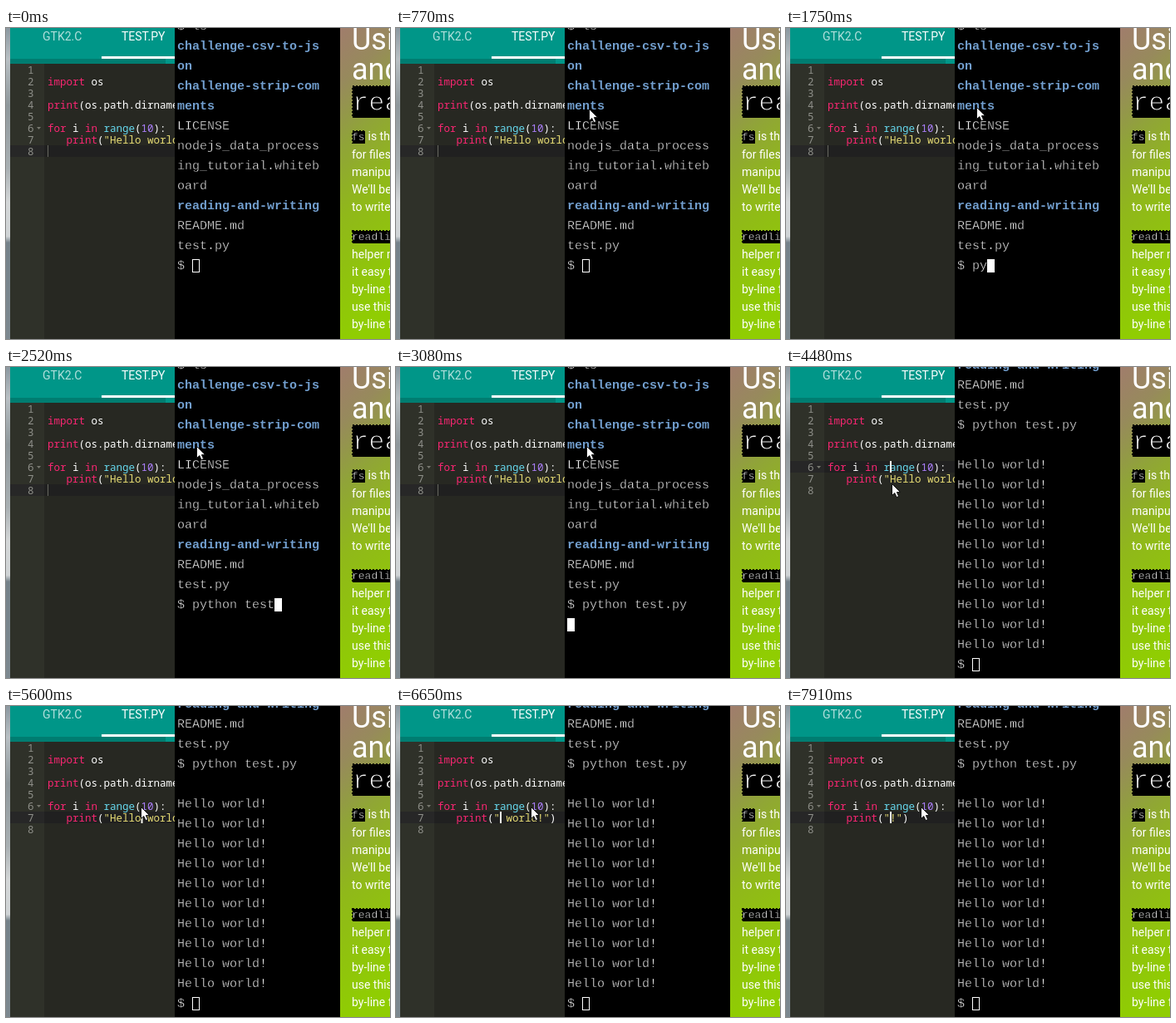
An HTML page for the animation above (8 s loop, 462 by 374 pixels).

```html
<!DOCTYPE html>
<html lang="en">
<head>
<meta charset="utf-8">
<title>Editor and terminal</title>
<style>
  html, body { margin: 0; width: 100%; height: 100%; overflow: hidden; background: #000; }
  svg { display: block; width: 462px; height: 374px; }
  text { white-space: pre; }
  .ui { font-family: Roboto, "Open Sans", sans-serif; font-size: 14px; fill: #fff; }
  .code { font-family: "Noto Sans Mono", "DejaVu Sans Mono", monospace; font-size: 12.5px; font-weight: 500; fill: #fff; }
  /* A black outline over the fill thins the strokes. */
  .term, .mono { font-family: "Liberation Mono", monospace; fill: #eee; stroke: #000; stroke-width: .35; }
  .term { font-size: 15px; }
  .mono { font-size: 13px; }
  .dir { font-weight: bold; fill: #729fcf; stroke: none; }
  .num { fill: #8f908a; text-anchor: end; }
  .kw { fill: #f92672; }
  .fn { fill: #66d9ef; }
  .str { fill: #e6db74; }
  .lit { fill: #ae81ff; }
  .h { font-size: 36px; }
  .big { font-size: 32px; stroke-width: 1.1; }
  .tag { fill: #000; stroke: #000; stroke-dasharray: 2 2; shape-rendering: crispEdges; }
</style>
</head>
<body>
<svg viewBox="0 0 462 374">
  <defs>
    <linearGradient id="edge" x2="0" y2="1">
      <stop offset="0" stop-color="#8b98a0"/>
      <stop offset=".1" stop-color="#b9c0c4"/>
      <stop offset=".25" stop-color="#8f989c"/>
      <stop offset=".45" stop-color="#a9b0b3"/>
      <stop offset=".56" stop-color="#d4d7d8"/>
      <stop offset=".67" stop-color="#d0d4d6"/>
      <stop offset=".69" stop-color="#75828a"/>
      <stop offset="1" stop-color="#7d8990"/>
    </linearGradient>
    <linearGradient id="page" x2=".15" y2="1">
      <stop offset="0" stop-color="#a07d6c"/>
      <stop offset=".18" stop-color="#978a5c"/>
      <stop offset=".38" stop-color="#90a438"/>
      <stop offset=".6" stop-color="#90b81a"/>
      <stop offset="1" stop-color="#90cd02"/>
    </linearGradient>
  </defs>

  <rect width="5" height="374" fill="url(#edge)"/>
  <rect x="5" width="198" height="374" fill="#272822"/>
  <rect x="5" width="41" height="374" fill="#2f3129"/>
  <g id="active">
    <rect x="5" width="41" height="14" fill="#272727"/>
    <rect x="46" width="157" height="14" fill="#202020"/>
  </g>
  <g id="code" class="code"></g>
  <path d="M37 119h5l-2.5 3z" fill="#77786f"/>
  <rect id="caret" height="14"/>
  <rect x="5" width="198" height="43" fill="#009688"/>
  <rect x="5" y="37" width="187" height="6" fill="#007d71"/>
  <rect x="115" y="34" width="88" height="3" fill="#fff"/>
  <g class="ui">
    <text x="44" y="15" opacity=".7">GTK2.C</text>
    <text x="139" y="15">TEST.PY</text>
  </g>

  <rect x="203" width="199" height="374"/>
  <g id="term" class="term"></g>
  <rect id="block"/>

  <rect x="402" width="60" height="374" fill="url(#page)"/>
  <g id="article" class="ui">
    <text class="h" x="416" y="26">Using</text>
    <text class="h" x="416" y="62">and</text>
    <rect class="tag" x="416.5" y="69.5" width="60" height="38"/>
    <text class="mono big" x="417" y="98.5">readline</text>
    <rect class="tag" x="416.5" y="123.5" width="15" height="15"/>
    <text class="mono" x="416" y="135">fs</text>
    <text x="435.5" y="135">is the</text>
    <rect class="tag" x="416.5" y="243.5" width="60" height="15"/>
    <text class="mono" x="416" y="255">readline</text>
  </g>

  <path id="mouse" d="M.5 .5V14.5L3.8 11.6 6 16.6 8.6 15.5 6.4 10.6H10.6Z"
        fill="#fff" stroke="#111" stroke-width="1" stroke-linejoin="round"/>
</svg>
<script>
const LOOP = 8000, TICK = 70;
const CHAR = 7.5, CODE_X = 50, ROW = 14, CODE_TOP = 43;
const TERM_X = 206, CELL = 9, LINE = 24;
const FOCUS_TERM = 840, ENTER = 3010, OUTPUT = 3150, BLINK = 3780, FOCUS_CODE = 4340;

const $ = id => document.getElementById(id);
const esc = s => s.replace(/&/g, "&amp;").replace(/</g, "&lt;");
const label = (x, y, html, cls = "") => `<text x="${x}" y="${y}" class="${cls}">${html}</text>`;
const span = (cls, s) => `<tspan class="${cls}">${esc(s)}</tspan>`;
const count = (times, t) => times.filter(at => at <= t).length;
const place = (el, attrs) => Object.entries(attrs).forEach(([k, v]) => el.setAttribute(k, v));

// Editor
const kw = s => span("kw", s);
const sourceLines = greeting => [
  "",
  kw("import") + " os",
  "",
  kw("print") + "(os.path.dirname(os.path",
  "",
  kw("for") + " i " + kw("in") + " " + span("fn", "range") + "(" + span("lit", "10") + "):",
  "   " + kw("print") + "(" + span("str", `"${greeting}"`) + ")",
  ""
];
const backspaces = [5880, 6090, 6230, 6440, 6650];
const deletes = [7140, 7280, 7420, 7560, 7700, 7910];

function caretAt(t) {
  if (t < FOCUS_CODE) return [8, 0];
  if (t < 4690) return [6, 10];
  if (t < 5250) return [8, 0];
  return [7, 15 - count(backspaces, t)];
}

function drawEditor(t) {
  const greeting = "Hello".slice(0, 5 - count(backspaces, t)) + " world".slice(count(deletes, t)) + "!";
  $("code").innerHTML = sourceLines(greeting).map((line, i) => {
    const y = CODE_TOP + ROW * i + 11.5;
    return label(33.5, y, i + 1, "num") + label(CODE_X, y, line);
  }).join("");
  const [row, col] = caretAt(t), y = CODE_TOP + ROW * (row - 1), focused = t >= FOCUS_CODE;
  $("active").setAttribute("transform", `translate(0 ${y})`);
  place($("caret"), {
    x: CODE_X + col * CHAR, y, width: focused ? 2 : 1, fill: focused ? "#f8f8f0" : "#66675f"
  });
}

// Terminal
const dir = s => span("dir", s);
const listing = [
  "$ ls", dir("challenge-csv-to-js"), dir("on"), dir("challenge-strip-com"), dir("ments"),
  "LICENSE", "nodejs_data_process", "ing_tutorial.whiteb", "oard",
  dir("reading-and-writing"), "README.md", "test.py"
];
const command = "python test.py";
const keys = [1470, 1750, 1890, 1960, 2030, 2170, 2240, 2310, 2380, 2450, 2520, 2660, 2800, 2870];

function drawTerminal(t) {
  const typed = command.slice(0, count(keys, t));
  const rows = [...listing, "$ " + typed];
  let col = 2 + typed.length;
  if (t >= ENTER) { rows.push(""); col = 0; }
  if (t >= OUTPUT) { rows.push(...Array(10).fill("Hello world!"), "$ "); col = 2; }
  const view = rows.slice(-16);
  $("term").innerHTML = view.map((s, i) => label(TERM_X, 2 + LINE * i, s)).join("");

  const hollow = t < FOCUS_TERM || t >= FOCUS_CODE;
  const x = TERM_X + CELL * col, y = LINE * (view.length - 1) - 10, inset = hollow ? .5 : 0;
  place($("block"), {
    x: x + inset, y: y + inset, width: CELL - 2 * inset, height: 16 - 2 * inset,
    fill: hollow ? "none" : "#fff", stroke: hollow ? "#fff" : "none",
    visibility: t >= BLINK && t < FOCUS_CODE ? "hidden" : "visible"
  });
}

// Pointer: time, x, y
const path = [
  [210, 2, 150], [420, 120, 130], [630, 222, 104], [770, 232, 97], [840, 229, 95],
  [3710, 229, 95], [3780, 228, 91], [3920, 214, 95], [4270, 124, 121], [4340, 124, 122],
  [4480, 127, 140], [4690, 128, 149], [4830, 129, 149], [5180, 161, 137], [5320, 164, 135],
  [5600, 162, 121], [LOOP, 162, 121]
];

function drawMouse(t) {
  const mouse = $("mouse");
  mouse.setAttribute("visibility", t < path[0][0] ? "hidden" : "visible");
  const i = path.findIndex(p => p[0] > t);
  if (i < 1) return;
  const [t0, x0, y0] = path[i - 1], [t1, x1, y1] = path[i], k = (t - t0) / (t1 - t0);
  const mix = (a, b) => Math.round(a + (b - a) * k);
  mouse.setAttribute("transform", `translate(${mix(x0, x1)} ${mix(y0, y1)})`);
}

// Article text
const paragraph = (lines, y) => lines.map((s, i) => label(416, y + 21.1 * i, s)).join("");
$("article").insertAdjacentHTML("beforeend",
  paragraph(["for files and", "manipulating", "We'll be", "to write"], 156.5) +
  paragraph(["helper module", "it easy to", "by-line from", "use this to", "by-line from", "source (or"], 277));

let shown = -1;
function draw(now) {
  const t = Math.floor((now % LOOP) / TICK) * TICK;
  if (t !== shown) {
    shown = t;
    drawEditor(t);
    drawTerminal(t);
    drawMouse(t);
  }
}

const start = performance.now();
function frame() {
  draw(performance.now() - start);
  requestAnimationFrame(frame);
}
frame();
</script>
</body>
</html>
```
